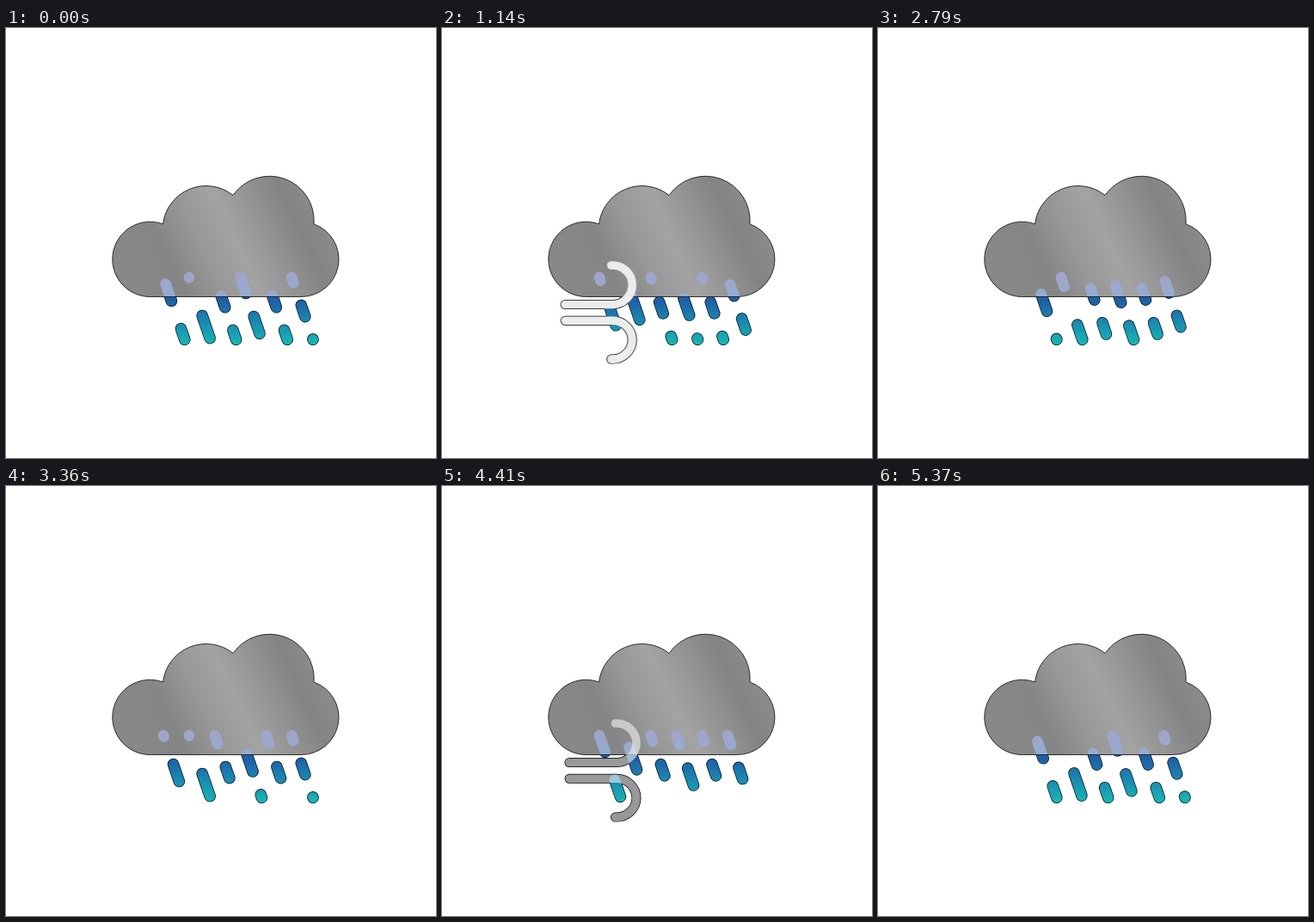
Write an HTML page without scripts that moves like this. It is 500 px wide and 500 px high and loops after 5.43 s.

```html
<!DOCTYPE html>
<html lang="en">
<head>
<meta charset="utf-8">
<title>Rain and wind</title>
<style>
  html, body { margin: 0; width: 100%; height: 100%; overflow: hidden; background: #fff; }
  svg { display: block; width: 100%; height: 100%; }

  /* Each column: d = drop length, p = spacing, s = first drop, n = spacings fallen per loop */
  .rain path {
    stroke-dasharray: var(--d) calc(var(--p) - var(--d));
    animation: fall 5430ms infinite;
  }
  .a { --d: 21px; --p: 55px; --s: 8px; --n: 12; }
  .b { --d: 27.7px; --p: 74.5px; --s: 47px; --n: 8; }
  .c { --d: 14px; --p: 42.2px; --s: 22.7px; --n: 15; }
  .d { --d: 21px; --p: 49.5px; --s: 48.1px; --n: 12; }
  .e { --d: 14px; --p: 41.8px; --s: 34.2px; --n: 16; }

  @keyframes fall {
    0% { stroke-dashoffset: calc(var(--s) * -1); animation-timing-function: steps(179); }
    98.895%, 100% { stroke-dashoffset: calc((var(--s) + var(--n) * var(--p) * .9989) * -1); }
  }

  .wind { animation: sway 5430ms ease-in-out infinite; }
  .gust { animation: fade 5430ms linear infinite; }
  .edge { animation: show 5430ms step-end infinite; }

  @keyframes sway {
    0%, 19.8%, 24.75%, 29.7%, 69.3%, 74.25%, 79.2%, 100% { transform: translateX(0); }
    22.28%, 27.23%, 71.78%, 76.73% { transform: translateX(-10px); }
  }
  @keyframes fade {
    0%, 14.85%, 35.4%, 64.36%, 84.9%, 100% { opacity: 0; }
    19.8%, 29.7%, 69.3%, 79.2% { opacity: 1; }
  }
  @keyframes show {
    0%, 35.4%, 84.9%, 100% { opacity: 0; }
    14.9%, 64.4% { opacity: 1; }
  }
</style>
</head>
<body>
<svg viewBox="0 0 500 500" fill="none" stroke-linecap="round">
  <defs>
    <linearGradient id="grey" gradientUnits="userSpaceOnUse" x1="150" y1="300" x2="372" y2="195">
      <stop offset="0" stop-color="#888"/>
      <stop offset=".2" stop-color="#858585"/>
      <stop offset=".36" stop-color="#979797"/>
      <stop offset=".52" stop-color="#a3a3a3"/>
      <stop offset=".66" stop-color="#959595"/>
      <stop offset=".82" stop-color="#838383"/>
      <stop offset="1" stop-color="#909090"/>
    </linearGradient>
    <linearGradient id="water" gradientUnits="userSpaceOnUse" x1="0" y1="284" x2="0" y2="369">
      <stop offset="0" stop-color="#2a45a0"/>
      <stop offset=".4" stop-color="#1f60a6"/>
      <stop offset=".66" stop-color="#1b86b0"/>
      <stop offset="1" stop-color="#18b8b4"/>
    </linearGradient>
    <linearGradient id="pale" gradientUnits="userSpaceOnUse" x1="0" y1="284" x2="0" y2="313">
      <stop offset="0" stop-color="#a3a3c8"/>
      <stop offset="1" stop-color="#94acd0"/>
    </linearGradient>
    <clipPath id="inside"><path d="M120 170H390V312H120z"/></clipPath>
  </defs>

  <g class="edge" stroke="#000" stroke-width="11">
    <g class="wind">
      <path d="M148 321.5H203a23 22.75 0 0 0 0-45.5h-1.5"/>
      <path d="M148 340.3H203a23 22.4 0 0 1 0 44.8h-1.5"/>
    </g>
  </g>

  <g class="rain" stroke="#0a1a24" stroke-width="13.6">
    <path class="a" d="M183 290l24.8 72.3"/>
    <path class="b" d="M212.9 290l24.8 72.3"/>
    <path class="c" d="M242.8 290l24.8 72.3"/>
    <path class="d" d="M272.6 290l24.8 72.3"/>
    <path class="c" d="M302.4 290l24.8 72.3"/>
    <path class="e" d="M332.2 290l24.8 72.3"/>
  </g>
  <g class="rain" stroke="url(#water)" stroke-width="12">
    <path class="a" d="M183 290l24.8 72.3"/>
    <path class="b" d="M212.9 290l24.8 72.3"/>
    <path class="c" d="M242.8 290l24.8 72.3"/>
    <path class="d" d="M272.6 290l24.8 72.3"/>
    <path class="c" d="M302.4 290l24.8 72.3"/>
    <path class="e" d="M332.2 290l24.8 72.3"/>
  </g>

  <path fill="url(#grey)" stroke="#1c1c1c" stroke-width=".9" d="M167.5 312.5A43.6 43.6 0 1 1 182.5 228A50.5 50.5 0 0 1 264 194.5A51.7 51.7 0 0 1 358 228A43.5 43.5 0 0 1 343.5 312.5z"/>

  <g class="rain" stroke="url(#pale)" stroke-width="12.6" clip-path="url(#inside)">
    <path class="a" d="M183 290l24.8 72.3"/>
    <path class="b" d="M212.9 290l24.8 72.3"/>
    <path class="c" d="M242.8 290l24.8 72.3"/>
    <path class="d" d="M272.6 290l24.8 72.3"/>
    <path class="c" d="M302.4 290l24.8 72.3"/>
    <path class="e" d="M332.2 290l24.8 72.3"/>
  </g>

  <g class="gust" stroke="#ececec" stroke-width="9.6">
    <g class="wind">
      <path d="M148 321.5H203a23 22.75 0 0 0 0-45.5h-1.5"/>
      <path d="M148 340.3H203a23 22.4 0 0 1 0 44.8h-1.5"/>
    </g>
  </g>
</svg>
</body>
</html>
```
